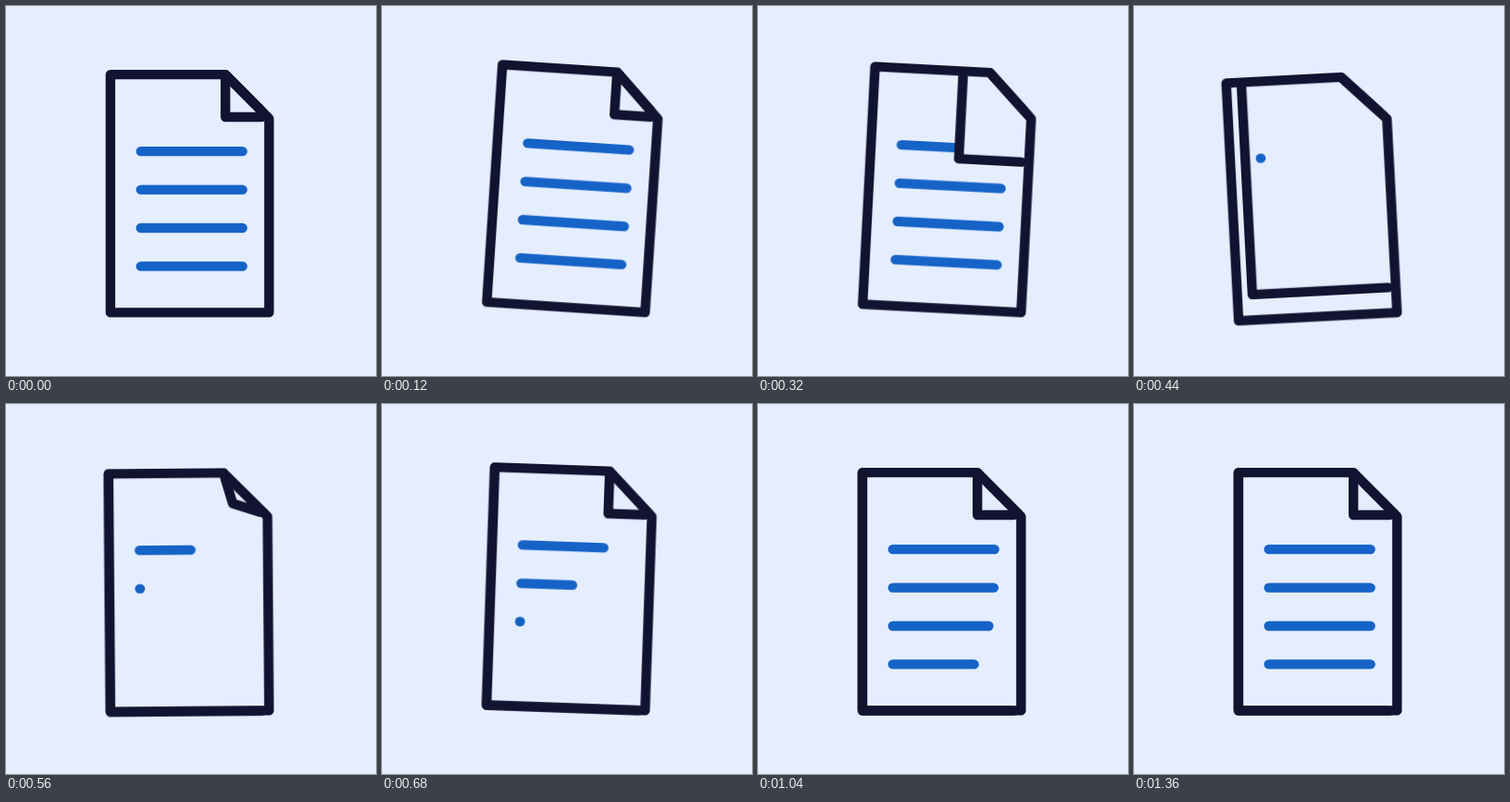
Recreate the animation shown at these times as an HTML page. Size 400 by 400 pixels, loop 1.96 s.

```html
<!DOCTYPE html>
<html lang="en">
<head>
<meta charset="utf-8">
<title>Document page turn</title>
<style>
  :root {
    --bg: #e4eeff;
    --ink: #121331;
    --blue: #1663c7;
    --loop: 1960ms;
    --smooth: cubic-bezier(.333, 0, .667, 1);
  }
  html, body { margin: 0; width: 100%; height: 100%; overflow: hidden; background: var(--bg); }
  svg { display: block; width: 100%; height: 100%; }
  path {
    fill: none;
    stroke: var(--ink);
    stroke-width: 10.4;
    stroke-linecap: round;
    stroke-linejoin: round;
  }
  .page, .cover, .turn, .fold { animation: var(--loop) var(--smooth) infinite; }

  .page { transform-origin: 284.4px 331.4px; animation-name: sway; }
  @keyframes sway {
    0% { transform: rotate(0deg); }
    11.73% { transform: rotate(7deg); }
    22.45% { transform: rotate(-3deg); }
    34.69% { transform: rotate(2deg); }
    46.94%, 100% { transform: rotate(0deg); }
  }

  /* The corner fold sweeps over the sheet and hides the old text. */
  .turn { animation-name: turn; }
  @keyframes turn {
    0%, 12.24% { d: path("M237.2 74.1V120H276.3"); }
    25.51%, 100% { d: path("M112.9 74.1V331.6H276.3"); }
  }
  .cover { fill: var(--bg); stroke: none; animation-name: cover; }
  @keyframes cover {
    0%, 12.24% { d: path("M237.2 74.1L237.2 120L284.4 120L284.4 121.6Z"); }
    25.51%, 100% { d: path("M112.9 74.1L112.9 331.4L284.4 331.4L284.4 121.6Z"); }
  }

  /* The next sheet's fold opens out of the cut corner. */
  .fold { animation-name: fold; }
  @keyframes fold {
    0%, 23.47% { d: path("M237.2 74.1L257 94L276.3 113.4"); }
    33.67%, 100% { d: path("M237.2 74.1L237.2 120L276.3 120"); }
  }

  .text path { stroke: var(--blue); }
  .old { animation: leave var(--loop) step-end infinite; }
  @keyframes leave { 0% { opacity: 1; } 22.45%, 100% { opacity: 0; } }
  .new { animation: enter var(--loop) step-end infinite; }
  @keyframes enter { 0% { opacity: 0; } 22.45%, 100% { opacity: 1; } }

  .new path {
    stroke-dasharray: 110 300;
    animation: write var(--loop) cubic-bezier(.333, .97, .667, .99) infinite;
    animation-delay: calc(var(--i) * 120ms - var(--loop));
  }
  @keyframes write {
    0%, 22.45% { opacity: 0; stroke-dashoffset: 110; }
    22.46% { opacity: 1; stroke-dashoffset: 110; }
    51.02%, 100% { opacity: 1; stroke-dashoffset: 0; }
  }
</style>
</head>
<body>
<svg viewBox="0 0 400 400">
  <g class="page">
    <g class="text old">
      <path d="M145.7 157.1h110M145.7 198.6h110M145.7 240h110M145.7 281.4h110"/>
    </g>
    <path class="cover" d="M237.2 74.1L237.2 120L284.4 120L284.4 121.6Z"/>
    <path d="M237.2 74.1H112.9V331.4H284.4V121.6Z"/>
    <path class="turn" d="M237.2 74.1V120H276.3"/>
    <path class="fold" d="M237.2 74.1L257 94L276.3 113.4"/>
    <g class="text new">
      <path style="--i:0" d="M145.7 157.1h110"/>
      <path style="--i:1" d="M145.7 198.6h110"/>
      <path style="--i:2" d="M145.7 240h110"/>
      <path style="--i:3" d="M145.7 281.4h110"/>
    </g>
  </g>
</svg>
</body>
</html>
```
